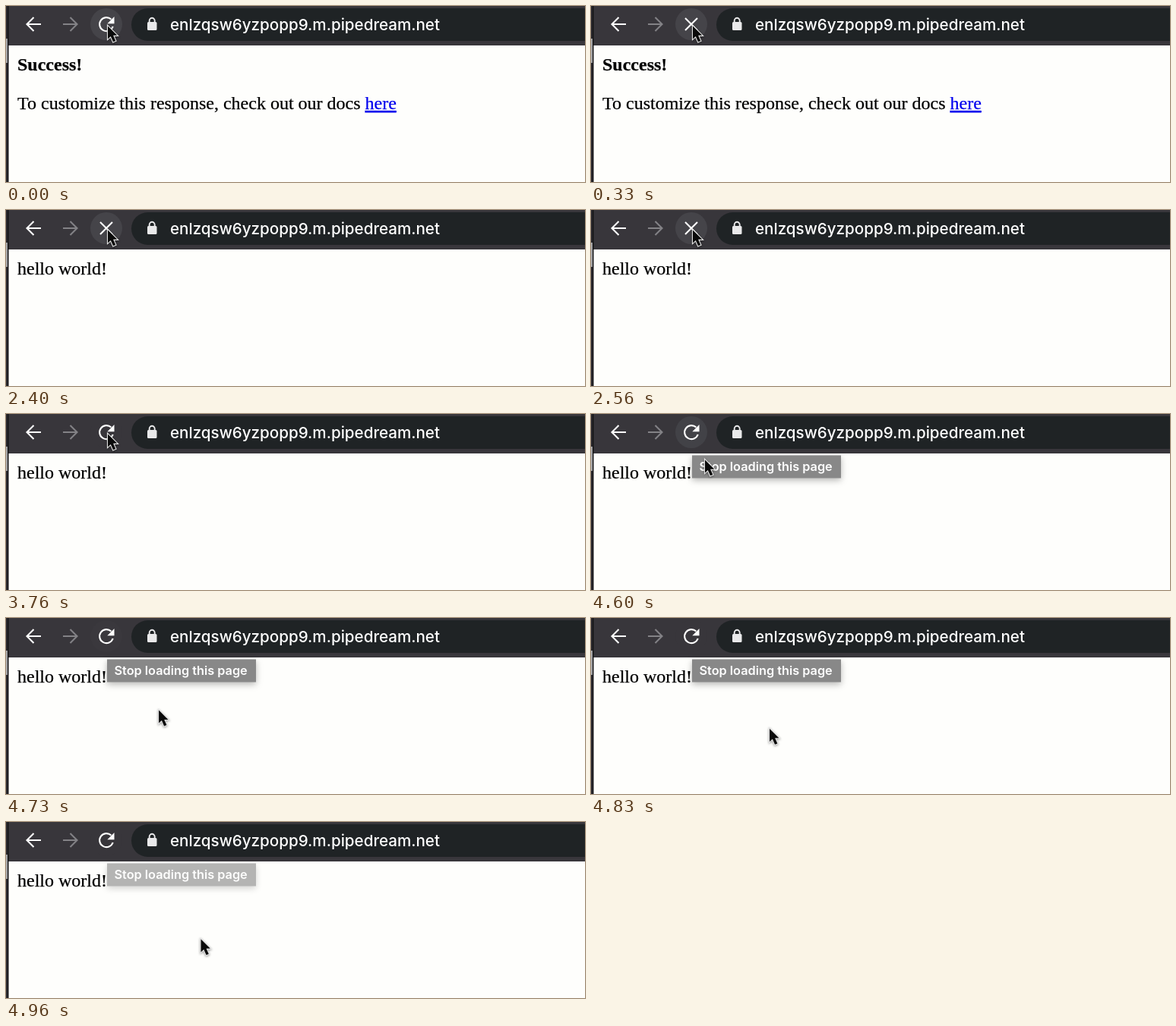
Recreate the animation shown at these times as an HTML page. Size 762 px wide and 232 px high, loop 5 s.

```html
<!DOCTYPE html>
<html lang="en">
<head>
<meta charset="utf-8">
<title>Page reload</title>
<style>
  html, body { margin: 0; width: 100%; height: 100%; overflow: hidden; }
  svg { display: block; width: 762px; height: 232px; }
  .page { font: 24px "Liberation Serif", "Times New Roman", serif; stroke: #000; stroke-width: .25; }
  .ui { font-family: Inter, Roboto, sans-serif; fill: #fff; }
  .icon { fill: none; stroke: #fff; stroke-width: 2.1; }
  #tip rect { filter: drop-shadow(0 3px 4px rgba(0, 0, 0, .28)); }
  #cursor { filter: drop-shadow(0 1.5px 1.5px rgba(0, 0, 0, .4)); }
</style>
</head>
<body>
<svg viewBox="0 0 762 232">
  <rect width="762" height="232" fill="#fefefc"/>

  <!-- toolbar -->
  <rect width="762" height="52" fill="#38363b"/>
  <rect x="165" y="3" width="640" height="43" rx="21.5" fill="#1f2325"/>
  <circle id="hover" cx="132" cy="24" r="21"/>
  <path class="icon" d="M46 24H28M36.5 15L27.5 24L36.5 33"/>
  <path class="icon" style="stroke:#838286" d="M75 24H93M84.5 15L93.5 24L84.5 33"/>
  <path id="stop" class="icon" d="M124 16L140 32M140 16L124 32"/>
  <g id="reload">
    <path class="icon" d="M140.7 27A9 9 0 1 1 138.4 17.6"/>
    <path fill="#fff" d="M142.5 14V23.2H133.3Z"/>
  </g>
  <rect x="186" y="21" width="12.5" height="11" rx="1.5" fill="#e9e9ea"/>
  <path d="M188.7 22V19.3a3.5 3.5 0 0 1 7 0V22" fill="none" stroke="#e9e9ea" stroke-width="1.9"/>
  <text class="ui" x="216" y="31.5" font-size="20.6" font-weight="500">enlzqsw6yzpopp9.m.pipedream.net</text>

  <!-- window edge -->
  <rect width="3" height="232" fill="#2b2a2e"/>
  <rect y="43" width="2" height="32" fill="#a5a5a7"/>
  <rect x="2" width="1.5" height="232" fill="#141416"/>

  <g id="before" class="page">
    <text x="15" y="85" font-weight="bold">Success!</text>
    <text x="15" y="136">To customize this response, check out our docs <tspan fill="#00e" stroke="#00e" text-decoration="underline">here</tspan></text>
  </g>
  <text id="after" class="page" x="15" y="85">hello world!</text>

  <g id="tip">
    <rect x="133" y="54.5" width="196" height="30" fill="#888"/>
    <text class="ui" x="142.5" y="75" font-size="16.3" font-weight="600">Stop loading this page</text>
  </g>
  <path id="cursor" d="M1.5 3.5V20.5L5.3 17L8.5 24.3L11.8 23L8.6 15.8H13.8Z"
        fill="#0a0a0a" stroke="#e4e4e4" stroke-width="2.2" paint-order="stroke"/>
</svg>
<script>
const LOOP = 5000, FRAME = 100 / 3;
const el = id => document.getElementById(id);
const show = (id, on) => el(id).style.display = on ? "" : "none";
const clamp = v => Math.min(1, Math.max(0, v));

// Pointer keys: time, position, velocity in px/ms
const keys = [
  { t: 4480, p: [132.5, 23], v: [0, 0] },
  { t: 4600, p: [148.5, 57], v: [.3, .42] },
  { t: 4733, p: [199.5, 118], v: [.37, .35] },
  { t: 4966, p: [255, 151], v: [0, 0] }
];

// Hermite curve through the keys, at rest before and after them
function pointer(t) {
  const next = keys.findIndex(k => k.t >= t);
  const i = next < 0 ? keys.length - 1 : Math.max(1, next);
  const a = keys[i - 1], b = keys[i];
  const d = b.t - a.t, s = clamp((t - a.t) / d), r = 1 - s;
  return [0, 1].map(k =>
    r * r * (1 + 2 * s) * a.p[k] + s * s * (3 - 2 * s) * b.p[k] +
    d * s * r * (r * a.v[k] - s * b.v[k]));
}

function hoverColor(t) {
  if (t < 3760) return "#454449";
  if (t < 3830) return "#38363b";
  const fade = 1 - clamp((t - 4600) / 160);
  return `rgb(${56 + 10 * fade}, ${54 + 12 * fade}, ${59 + 12 * fade})`;
}

function draw(now) {
  const time = now % LOOP;
  const tick = Math.floor(time / 10) * 10;
  const t = Math.floor((tick + 6.7) / FRAME) * FRAME;   // 30 steps a second
  const loading = time >= 330 && time < 3760;
  show("stop", loading);
  show("reload", !loading);
  show("before", time < 2400);
  show("after", time >= 2400);
  show("tip", time >= 3830);
  el("tip").setAttribute("opacity", 1 - .38 * clamp((t - 4833) / 133));
  el("hover").setAttribute("fill", hoverColor(time));
  el("cursor").setAttribute("transform", `translate(${pointer(t)})`);
}

let start;
function loop(now) {
  start ??= now;
  draw(now - start);
  requestAnimationFrame(loop);
}
draw(0);
requestAnimationFrame(loop);
</script>
</body>
</html>
```
